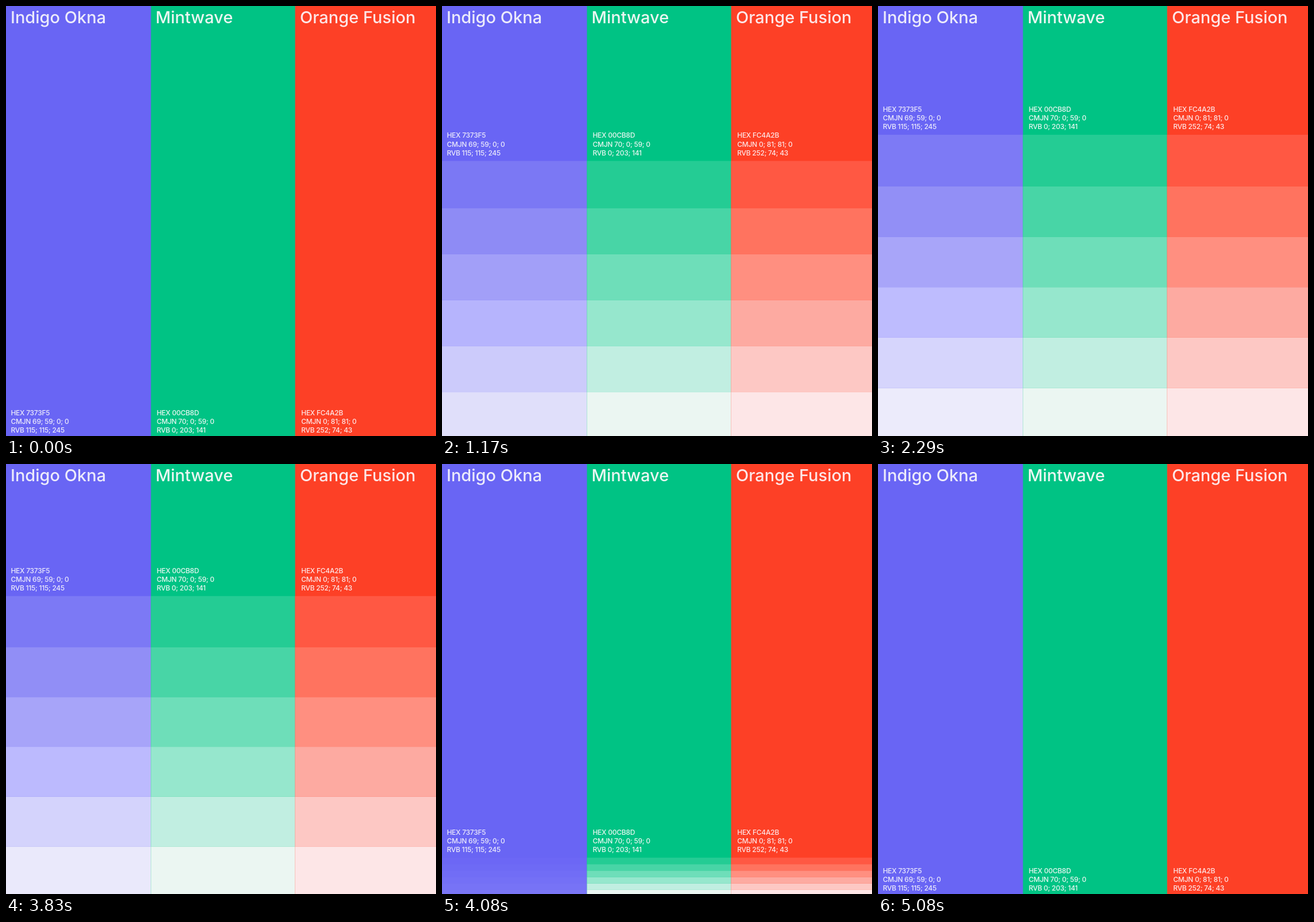
Write an HTML page with a canvas that moves like this. It is 749 px wide and 748 px high and loops after 6.12 s.

```html
<!DOCTYPE html>
<html lang="en">
<head>
<meta charset="utf-8">
<title>Colour palette</title>
<style>
  html, body { margin: 0; width: 100%; height: 100%; overflow: hidden; }
  canvas { display: block; }
</style>
</head>
<body>
<canvas id="stage" width="749" height="748"></canvas>
<script>
const ctx = document.getElementById('stage').getContext('2d');
const WIDTH = 749, HEIGHT = 748;
const LOOP = 6120, FRAME = 1000 / 24;
const OPEN_AT = 879, CLOSE_AT = 3818;
const FLOOR = 752;          // where the tints are stacked when closed
const BAND = 87.6;          // height of one fully opened tint

const columns = [
  { x: 0, titleX: 8, noteX: 8.4, base: '#6965f4', name: 'Indigo Okna', fades: true,
    notes: ['HEX 7373F5', 'CMJN 69; 59; 0; 0', 'RVB 115; 115; 245'],
    tints: ['#7d7af5', '#928ff6', '#a8a5f9', '#bebcfe', '#d6d5fc', '#ecebfb'] },
  { x: 252.5, titleX: 260.5, noteX: 262.4, base: '#00c384', name: 'Mintwave',
    notes: ['HEX 00CB8D', 'CMJN 70; 0; 59; 0', 'RVB 0; 203; 141'],
    tints: ['#24cc94', '#48d5a6', '#6edeb9', '#96e7cd', '#c1eee1', '#ebf6f2'] },
  { x: 503.6, titleX: 512, noteX: 514.2, base: '#fd4026', name: 'Orange Fusion',
    notes: ['HEX FC4A2B', 'CMJN 0; 81; 81; 0', 'RVB 252; 74; 43'],
    tints: ['#ff5843', '#ff735f', '#ff8f80', '#fdaaa1', '#fdc8c4', '#fde6e7'] }
];

// Step response of a damped spring: stiffness 100, damping 15, mass 1.
function spring(ms) {
  const t = Math.max(0, ms) / 1000;
  const decay = 7.5, omega = Math.sqrt(100 - decay * decay);
  return 1 - Math.exp(-decay * t) *
    (Math.cos(omega * t) + decay / omega * Math.sin(omega * t));
}

function drawText(text, x, y, size, spacing) {
  ctx.font = `500 ${size}px Inter, sans-serif`;
  ctx.letterSpacing = spacing + 'px';
  ctx.fillText(text, x, y);
}

// Each column fills to the right edge; the next one covers the rest.
function drawColumn({ x, base, tints, fades, name, titleX, notes, noteX }, open) {
  const bandTop = i => FLOOR - open * (BAND * (6 - i) + (i ? 0 : 2.4));
  const fill = (color, top, bottom) => {
    ctx.fillStyle = color;
    ctx.fillRect(x, top, WIDTH - x, bottom - top);
  };

  fill(base, 0, HEIGHT);
  ctx.globalAlpha = fades ? Math.min(1, Math.max(0, open)) : 1;
  tints.forEach((tint, i) => fill(tint, bandTop(i), i < 5 ? bandTop(i + 1) : FLOOR));
  ctx.globalAlpha = 1;

  ctx.fillStyle = tints[5];
  drawText(name, titleX, 30, 29, 0);
  notes.forEach((note, i) =>
    drawText(note, noteX, bandTop(0) - 40.2 + i * 15.3, 12, -0.25));
}

function draw(now) {
  // The motion advances at 24 steps per second.
  const time = Math.floor((now % LOOP + 5) / FRAME) * FRAME;
  const open = time < CLOSE_AT ? spring(time - OPEN_AT) : 1 - spring(time - CLOSE_AT);
  columns.forEach(column => drawColumn(column, open));
}

const start = performance.now();
function tick() {
  draw(performance.now() - start);
  requestAnimationFrame(tick);
}
tick();
</script>
</body>
</html>
```
